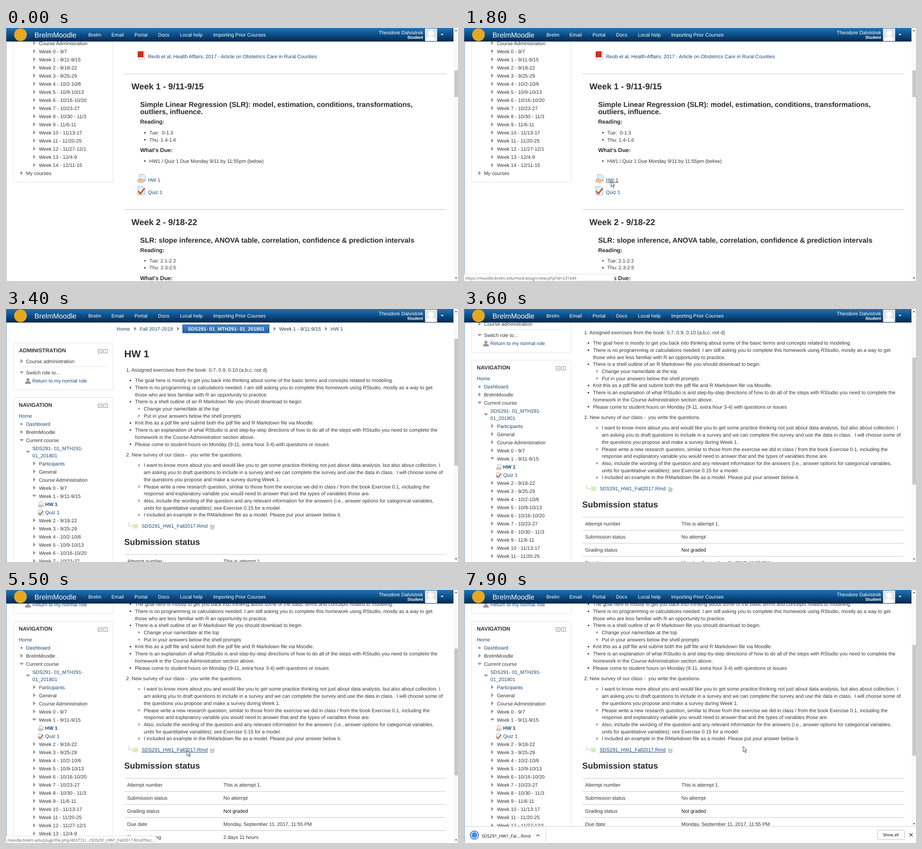
Recreate the animation shown at these times as an HTML page. Size 999 px wide and 561 px high, loop 8000 ms.

```html
<!DOCTYPE html>
<html lang="en">
<head>
<meta charset="utf-8">
<title>Course homework page</title>
<style>
html, body { margin: 0; width: 100%; height: 100%; overflow: hidden; background: #fff; }
svg { display: block; width: 999px; height: 561px; font: 10.99px "Liberation Sans", Arial, sans-serif; fill: #333; text-rendering: geometricPrecision; }
.link { fill: #1d4674; }
.bold, .h1, .h2, .h3, .h4, .block { font-weight: bold; }
.h1, .h2, .h3, .h4 { fill: #2b2b2b; }
.h1 { font-size: 21.98px; }
.h2 { font-size: 18.84px; }
.h3, .brand { font-size: 15.7px; }
.h4 { font-size: 12.56px; }
.block { font-size: 12.09px; }
.small { font-size: 9.42px; }
.white { fill: #fff; }
.dark { fill: #0c0c1c; }
.ui { font-family: "Open Sans", "Noto Sans", sans-serif; }
.grey { fill: #999; }
</style>
</head>
<body>
<svg id="stage" viewBox="0 0 999 561">
  <defs>
    <linearGradient id="navy" x2="0" y2="1">
      <stop stop-color="#2273b5"/><stop offset=".5" stop-color="#0c4d86"/><stop offset="1" stop-color="#04284a"/>
    </linearGradient>
    <linearGradient id="button" x2="0" y2="1">
      <stop stop-color="#4385c8"/><stop offset="1" stop-color="#2060a8"/>
    </linearGradient>
    <g id="homework">
      <path d="M4 .5h9l4 4V15H4z" fill="#dff1fd" stroke="#7fb6da"/>
      <path d="M.5 12q4-3 8-1l8 2q2 1-1 3l-6 3q-6 0-9-2z" fill="#ecc49c" stroke="#c48d58" stroke-width=".7"/>
    </g>
    <g id="quiz">
      <path d="M1 .5h11l4.500 4.500v14H1z" fill="#dff1fd" stroke="#7fb6da"/>
      <path d="M1.500 10.500l5 6L16 4" fill="none" stroke="#d4501c" stroke-width="3"/>
    </g>
    <g id="boxIcons" fill="none" stroke="#888">
      <path d="M203.500 89.500h9v8h-9zM215.500 89.500h9v8h-9zM205.500 93.500h5M221 91.500l-2 2 2 2"/>
    </g>
    <clipPath id="chipClip"><rect id="chipArea" y="526" height="35"/></clipPath>
  </defs>
  <g id="coursePage"></g>
  <g id="homeworkPage"></g>
  <g id="header"></g>
  <g id="scrollbar">
    <rect x="989" width="10" height="561" fill="#f9f9f9"/>
    <path d="M992 7l2.700-3 2.700 3z" fill="#555"/>
    <path id="downArrow" d="M992-2l2.700 3 2.700-3z" fill="#555"/>
    <rect id="thumb" x="991" width="8" fill="#c8c8c8"/>
  </g>
  <rect id="edge" width="1" height="561"/>
  <g id="status">
    <path d="M0 545.500h329q3 0 3 3V561H0z" fill="#fff" stroke="#ddd"/>
    <text id="statusText" class="ui" x="3" y="557.500" font-size="8.900" fill="#555"></text>
  </g>
  <g id="downloadBar"></g>
  <g id="fallingArrow">
    <rect x="16" y="488" width="26" height="46" fill="#fff"/>
    <path d="M26 502h6v8h5l-8 8-8-8h5zM16 529h26v3H16z" fill="#4285f4"/>
  </g>
  <g id="cursor" fill="#fff" stroke="#222" stroke-width=".9" stroke-linejoin="round">
    <path id="arrow" d="M0 0V12L2.800 9.500 4.800 13.800 6.600 13 4.600 8.800H8.300Z"/>
    <path id="hand" d="M-1 .8q1-1 2 0V6l6 1.500q1.600.6 1.200 2.500L7 16H0L-4.500 10q0-2 1.500-1.200L-1 10z"/>
  </g>
</svg>
<script>
const $ = id => document.getElementById(id);
const show = (id, on) => $(id).style.display = on ? '' : 'none';

// Drawing helpers
const text = (x, y, s, cls = '', extra = '') => `<text x="${x}" y="${y}" class="${cls}" ${extra}>${s}</text>`;
const path = (d, attrs) => `<path d="${d}" ${attrs}/>`;
const rect = (x, y, w, h, attrs) => `<rect x="${x}" y="${y}" width="${w}" height="${h}" ${attrs}/>`;
const rule = (x1, x2, y, color = '#c6c6c6') => path(`M${x1} ${y}H${x2}`, `stroke="${color}"`);
const icon = (id, x, y, scale = 1) => `<use href="#${id}" transform="translate(${x} ${y}) scale(${scale})"/>`;
const closed = (x, y) => path(`M${x} ${y - 9}l5.500 4.700-5.500 4.700z`, 'class="grey"');
const opened = (x, y) => path(`M${x} ${y - 6.5}h10l-5 5z`, 'class="grey"');
const dot = (x, y) => `<circle cx="${x}" cy="${y - 3.7}" r="1.700"/>`;
const ring = (x, y) => `<circle cx="${x}" cy="${y - 3.7}" r="1.700" fill="none" stroke="#333" stroke-width=".8"/>`;
const panel = (y, h) => rect(16.5, y, 220, h, 'rx="3" fill="#fff" stroke="#e2e2e2"');

const LINE = 15.7, ROW = 18.04;
const weeks = ['0 - 9/7', '1 - 9/11-9/15', '2 - 9/18-22', '3 - 9/25-29', '4 - 10/2-10/6', '5 - 10/9-10/13',
  '6 - 10/16-10/20', '7 - 10/23-27', '8 - 10/30 - 11/3', '9 - 11/6-11', '10 - 11/13-17', '11 - 11/20-25',
  '12 - 11/27-12/1', '13 - 12/4-9', '14 - 12/11-15'].map(w => 'Week ' + w);

const treeItem = (s, y, cls) => closed(60, y) + text(72.7, y, s, cls);
const tree = (items, y) => items.map((s, i) => treeItem(s, y + i * ROW)).join('');
const myCourses = y => closed(32, y) + text(44.2, y, 'My courses');

// Wrapped list lines: "*" starts a bullet, "o" starts a nested bullet, "+" and "-" continue them
const list = (lines, y) => lines.map((line, i) => {
  const mark = line[0], base = y + i * LINE, nested = mark === 'o' || mark === '-';
  const bullet = mark === '*' ? dot(275, base) : mark === 'o' ? ring(294, base) : '';
  return bullet + text(nested ? 304.5 : 285, base, line.slice(1));
}).join('');

$('coursePage').innerHTML =
  panel(-10, 352) + tree(['Course Administration', ...weeks], 37.6) + myCourses(326) +
  rect(293.5, 51.5, 13, 18, 'fill="#f4f4f4" stroke="#bbb"') + rect(291, 52, 13, 13, 'fill="#d9281e"') +
  text(313.7, 67.3, 'Reob et al, Health Affairs, 2017 - Article on Obstetrics Care in Rural Counties', 'link') +
  rule(261, 973, 101.6) + text(277.3, 136.4, 'Week 1 - 9/11-9/15', 'h2') +
  text(296.5, 175, 'Simple Linear Regression (SLR): model, estimation, conditions, transformations,', 'h3') +
  text(296.5, 190.7, 'outliers, influence.', 'h3') +
  text(296.5, 212.4, 'Reading:', 'h4') +
  dot(307, 235.9) + text(316.7, 235.9, 'Tue:\u00a0 0-1.3') + dot(307, 251.5) + text(316.7, 251.5, 'Thu: 1.4-1.6') +
  text(296.5, 275, "What's Due:", 'h4') +
  dot(307, 298.7) + text(316.5, 298.7, 'HW1 / Quiz 1 Due Monday 9/11 by 11:55pm (below)') +
  icon('homework', 291, 324) + text(313.7, 340.8, 'HW 1', 'link', 'id="homeworkLink"') +
  icon('quiz', 290.5, 351) + text(313.7, 367.7, 'Quiz 1', 'link') +
  rule(261, 973, 402.6) + text(277.3, 437.4, 'Week 2 - 9/18-22', 'h2') +
  text(296.5, 475.6, 'SLR: slope inference, ANOVA table, correlation, confidence &amp; prediction intervals', 'h3') +
  text(296.5, 496.5, 'Reading:', 'h4') +
  dot(307, 519.8) + text(316.7, 519.8, 'Tue: 2.1-2.2') + dot(307, 535.4) + text(316.7, 535.4, 'Thu: 2.3-2.5') +
  text(296.5, 558.5, "What's Due:", 'h4');

const breadcrumb =
  text(244.5, 48, 'Home', 'link') + closed(283, 48) + text(295.5, 48, 'Fall 2017-2018', 'link') + closed(378, 48) +
  rect(390.5, 35, 191, 18, 'fill="url(#button)" stroke="#173f73"') +
  text(401.7, 48, 'SDS291- 01_MTH291- 01_201801', 'bold white') +
  closed(591, 48) + text(603.7, 48, 'Week 1 - 9/11-9/15') + closed(705, 48) + text(717.5, 48, 'HW 1', 'link');

const administration =
  panel(75.5, 104) + text(28.7, 96.4, 'ADMINISTRATION', 'block') + icon('boxIcons', 0, 0) +
  closed(32, 120) + text(44.2, 120, 'Course administration') + rule(29, 225, 128, '#e4e4e4') +
  opened(29.5, 145) + text(44.2, 145, 'Switch role to...') +
  '<circle cx="48.500" cy="156.500" r="3.300" class="grey"/>' + path('M42 166q0-5 4-6h5q4 1 4 6z', 'class="grey"') +
  text(58.3, 163, 'Return to my normal role', 'link');

const navigation =
  panel(196.5, 530) + text(28.3, 217.3, 'NAVIGATION', 'block') + icon('boxIcons', 0, 121) +
  text(28.2, 241, 'Home', 'link') + rect(32, 253, 4.5, 4.5, 'class="grey"') + text(44.2, 259, 'Dashboard', 'link') +
  closed(32, 277) + text(44.2, 277, 'BrelmMoodle') + opened(29.5, 295) + text(44.2, 295, 'Current course') +
  text(58.3, 313, 'SDS291- 01_MTH291-', 'link') + text(58.3, 328.5, '01_201801', 'link') + opened(43.5, 321) +
  treeItem('Participants', 346.5, 'link') + tree(['General', 'Course Administration', weeks[0]], 364.5) +
  opened(57.5, 418.6) + text(72.7, 418.6, weeks[1]) +
  icon('homework', 71, 427, .68) + text(86.5, 436.8, 'HW 1', 'link bold') +
  icon('quiz', 71, 445, .68) + text(86.5, 454.8, 'Quiz 1', 'link') +
  tree(weeks.slice(2), 472.8) + myCourses(707.3);

const assignment =
  text(261.3, 106.8, 'HW 1', 'h1') + text(265.6, 139, '1. Assigned exercises from the book: 0.7, 0.9, 0.10 (a,b,c; not d)') +
  list([
    '*The goal here is mostly to get you back into thinking about some of the basic terms and concepts related to modeling.',
    '*There is no programming or calculations needed. I am still asking you to complete this homework using RStudio, mostly as a way to get',
    '+those who are less familiar with R an opportunity to practice.',
    '*There is a shell outline of an R Markdown file you should download to begin.',
    'oChange your name/date at the top',
    'oPut in your answers below the shell prompts',
    '*Knit this as a pdf file and submit both the pdf file and R Markdown file via Moodle.',
    '*There is an explanation of what RStudio is and step-by-step directions of how to do all of the steps with RStudio you need to complete the',
    '+homework in the Course Administration section above.',
    '*Please come to student hours on Monday (9-11, extra hour 3-4) with questions or issues'
  ], 162.2) +
  text(265.6, 327, '2. New survey of our class -\u00a0 you write the questions.') +
  list([
    'oI want to know more about you and would like you to get some practice thinking not just about data analysis, but also about collection. I',
    '-am asking you to draft questions to include in a survey and we can complete the survey and use the data in class.\u00a0 I will choose some of',
    '-the questions you propose and make a survey during Week 1.',
    'oPlease write a new research question, similar to those from the exercise we did in class / from the book Exercise 0.1, including the',
    '-response and explanatory variable you would need to answer that and the types of variables those are.',
    'oAlso, include the wording of the question and any relevant information for the answers (i.e., answer options for categorical variables,',
    '-units for quantitative variables); see Exercise 0.15 for a model.',
    'oI included an example in the RMarkdown file as a model. Please put your answer below it.'
  ], 350.4) +
  path('M271.500 473v8.500h8', 'fill="none" stroke="#bbb"') +
  rect(280, 476, 12, 11, 'fill="#eef6cf"') + path('M281 479h10M281 482h10M281 485h10', 'stroke="#b9d68c"') +
  text(299.7, 485.4, 'SDS291_HW1_Fall2017.Rmd', 'link', 'id="fileLink"') +
  path('M455.500 478.500h-3v9h7v-3M454 484q0-3 4-3v-2l3 3-3 3v-2z', 'fill="none" stroke="#888"');

const statusTable = [
  ['Attempt number', 'This is attempt 1.'], ['Submission status', 'No attempt'], ['Grading status', 'Not graded', 'dark'],
  ['Due date', 'Monday, September 11, 2017, 11:55 PM'], ['Time remaining', '2 days 11 hours']
].map(([label, value, cls], i) => {
  const y = 544.5 + 29 * i;
  return rule(262, 972, y) + text(267.7, y + 18.3, label) + text(480.6, y + 18.3, value, cls);
}).join('');

$('homeworkPage').innerHTML = breadcrumb + administration + navigation + assignment +
  text(261.3, 523.4, 'Submission status', 'h2') + statusTable;

const menu = [[182, 'Brelm'], [233, 'Email'], [284, 'Portal'], [336, 'Docs'], [384.5, 'Local help'], [458, 'Importing Prior Courses']];
$('header').innerHTML = rect(1, 0, 988, 30, 'fill="url(#navy)"') +
  '<circle cx="32" cy="15" r="14" fill="#e5a823"/>' +
  text(63, 20.5, 'BrelmMoodle', 'brand white') +
  menu.map(([x, s]) => text(x, 19, s, 'white')).join('') +
  text(922, 14, 'Theodore Dalvistrek', 'white', 'text-anchor="end"') +
  text(922, 24, 'Student', 'white bold small', 'text-anchor="end"') +
  rect(926, 1, 27, 28, 'fill="#e4e4e4"') +
  '<circle cx="939.500" cy="12" r="6" fill="#fff"/>' + path('M929 29q0-8 7-10h7q7 2 7 10z', 'fill="#fff"') +
  path('M960.500 13h6.500l-3.200 3.200z', 'fill="#fff"');

$('downloadBar').innerHTML = rect(1, 525, 998, 37, 'fill="#fff"') + rule(1, 999, 524.5, '#cfcfcf') +
  `<g clip-path="url(#chipClip)">
    <circle cx="23" cy="543.500" r="6.500" fill="#4a8fd8"/>
    <circle id="progress" cx="23" cy="543.500" r="9" fill="none" stroke="#2f7ad6" stroke-width="2"/>
    ${text(39, 549, 'SDS291_HW1_Fal....Rmd', 'ui dark', 'font-size="9.650"')}
    <path id="chipCaret" d="M-22 546l3.500-3.500 3.500 3.500" fill="none" stroke="#444" stroke-width="1.300"/>
    <path d="M181 528v30" stroke="#ccc"/>
  </g>` +
  rect(913.5, 532.5, 60, 21, 'rx="2" fill="#fff" stroke="#bbb"') +
  text(943.5, 546.3, 'Show all', 'ui', 'font-size="8.800" font-weight="600" text-anchor="middle"') +
  path('M984.500 539.500l7 7m0-7l-7 7', 'stroke="#444" stroke-width="1.500"');

// Linear interpolation through rows of [time, ...values]
function along(keys, t) {
  const next = keys.findIndex(k => k[0] > t);
  if (next < 0) return keys.at(-1).slice(1);
  if (next === 0) return keys[0].slice(1);
  const a = keys[next - 1], b = keys[next], p = (t - a[0]) / (b[0] - a[0]);
  return a.slice(1).map((v, i) => v + (b[i + 1] - v) * p);
}

const LOOP = 8000, STEP = 100, PAGE_HEIGHT = 1075, BREADCRUMB_SCROLL = 113;
const scrollKeys = [[3200, 0], [3300, 50], [3400, 113], [3600, 196], [3800, 240]];
const barKeys = [[5600, 0], [5900, 36]];
const chipKeys = [[5800, 0], [6200, 133], [6400, 182]];
const cursorKeys = [[0, 594, 466], [900, 325, 340], [2100, 325, 340], [2700, 541, 357], [4100, 541, 357],
  [4600, 400, 356], [5700, 400, 356], [6100, 634, 345], [6200, 634, 345], [6900, 617, 347]];

function drawScrollbar(onHomework, scroll, height) {
  const ratio = (height - 22) / PAGE_HEIGHT;
  $('thumb').setAttribute('y', onHomework ? 9.5 + scroll * ratio : 94);
  $('thumb').setAttribute('height', onHomework ? height * ratio : 59);
  $('downArrow').setAttribute('transform', `translate(0 ${height - 6})`);
}

function drawDownload(t, bar) {
  const [chip] = along(chipKeys, t), loading = t < 6600, progress = $('progress');
  show('downloadBar', bar > 0);
  $('downloadBar').setAttribute('transform', `translate(0 ${36 - bar})`);
  $('chipArea').setAttribute('width', chip);
  $('chipCaret').setAttribute('transform', `translate(${chip})`);
  progress.setAttribute('stroke-dasharray', loading ? '34 23' : 'none');
  progress.setAttribute('transform', `rotate(${loading ? t * .36 : 0} 23 543.5)`);
  progress.style.opacity = loading ? 1 : .55 + .45 * Math.cos((t - 7900) / 1000 * 2 * Math.PI);

  const fall = (t - 5900) / 600;
  $('fallingArrow').style.opacity = fall > 0 && fall < 1 ? Math.sin(fall * Math.PI) : 0;
  $('fallingArrow').setAttribute('transform', `translate(0 ${(fall - .5) * 24})`);
}

function draw(t) {
  const onHomework = t >= 2100;
  const [scroll] = along(scrollKeys, t), [bar] = along(barKeys, t), [x, y] = along(cursorKeys, t);
  show('coursePage', !onHomework);
  show('homeworkPage', onHomework);
  $('homeworkPage').setAttribute('transform', `translate(0 ${BREADCRUMB_SCROLL - scroll})`);
  drawScrollbar(onHomework, scroll, 561 - bar);
  $('edge').setAttribute('fill', t < 1800 ? '#a0a0a0' : '#3a8bd8');

  $('homeworkLink').style.textDecoration = t >= 900 ? 'underline' : '';
  $('fileLink').style.textDecoration = t >= 4500 ? 'underline' : '';
  show('status', (t >= 1100 && t < 2100) || (t >= 4800 && t < 5700));
  $('statusText').textContent = onHomework
    ? 'moodle.brelm.edu/pluginfile.php/403772/.../SDS291_HW1_Fall2017.Rmd?forc...'
    : 'https://moodle.brelm.edu/mod/assign/view.php?id=231649';
  drawDownload(t, bar);

  const pointing = (t >= 900 && t < 1800) || (t >= 4500 && t < 5500);
  show('cursor', t >= 100 && !(t >= 2900 && t < 4200));
  show('hand', pointing);
  show('arrow', !pointing);
  $('cursor').setAttribute('transform', `translate(${Math.round(x)} ${Math.round(y)})`);
}

const start = performance.now();
function tick() {
  const t = (performance.now() - start) % LOOP;
  draw(Math.floor(t / STEP) * STEP);
  requestAnimationFrame(tick);
}
tick();
</script>
</body>
</html>
```
